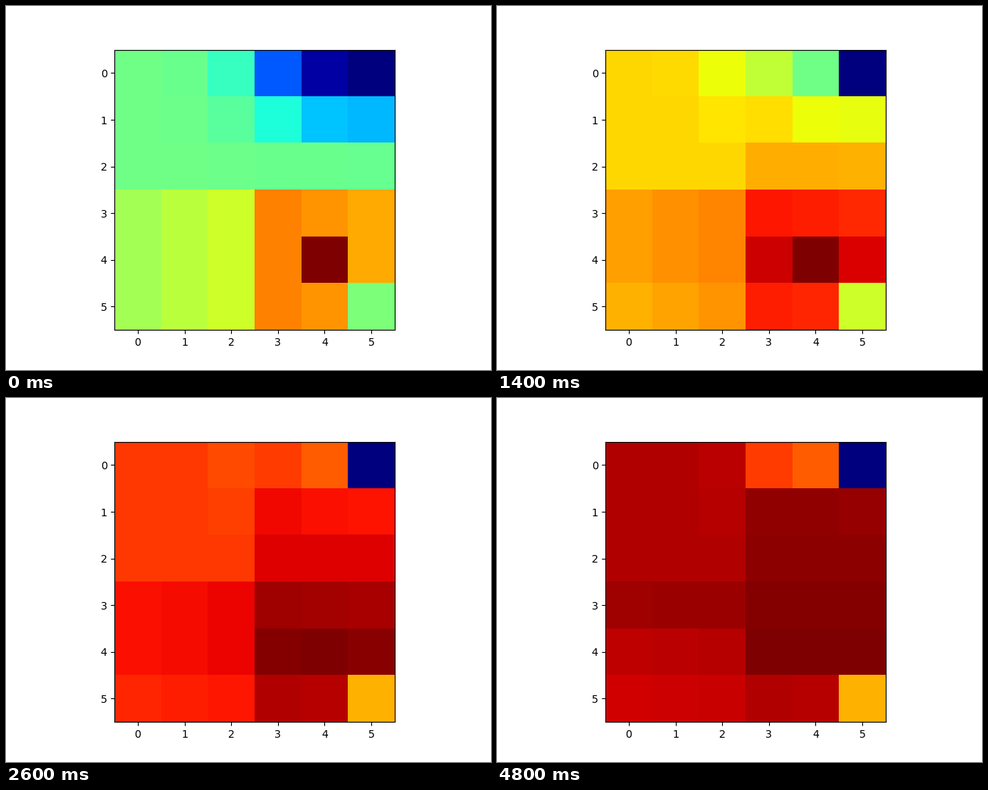
Animation, 640 px wide and 480 px high, one loop 5000 ms. Source, as a matplotlib script:

```python
import numpy as np
import matplotlib.pyplot as plt
from matplotlib.animation import FuncAnimation

FRAMES, INTERVAL = 25, 200
GOAL, TRAP, CORNER = (4, 4), (0, 5), (5, 5)

row, col = np.indices((6, 6))
right = col > 2
low = row >= 3

# Initial gap to the full value 1: widest around the trap, narrow near the goal.
trap_pull = np.exp(-((5 - col) / 2.4) ** 3 - row ** 2)
gap = np.where(low,
               np.interp(col, [0, 2, 3, 5], [0.45, 0.4, 0.23, 0.27]),
               0.515 + 0.485 * trap_pull)
gap[GOAL] = 0
gap[CORNER] = 0.5

# Decay rate of the gap: the right half and the rows by the goal learn faster.
beside_goal = (row == GOAL[0]) & (abs(col - GOAL[1]) == 1)
rate = (1.05 + 0.5 * right + 0.15 * ((row == 3) | (row == 4))
        + 1.3 * beside_goal)
rate[TRAP] = 0
rate[CORNER] = 0.55

# Seldom visited cells stop learning early.
limit = np.full(gap.shape, np.inf)
limit[4:, :3] = 1.75
limit[[0, 5], 3:] = 1.05


def progress(t):
    """Amount learned after t seconds; the right half starts more slowly."""
    times = [0, 0.8, 1.8, 3.4, 4.8]
    slow, fast = (np.interp(t, times, [0, first, 0.63, 1.73, 2.3])
                  for first in (0.08, 0.2))
    return np.minimum(np.where(right, slow, fast), limit)


def values(t):
    return 1 - gap * np.exp(-rate * progress(t))


fig, ax = plt.subplots(figsize=(6.4, 4.8), dpi=100)
heat = ax.imshow(values(0), cmap="jet", vmin=0, vmax=1)


def update(i):
    heat.set_data(values(i * INTERVAL / 1000))
    return [heat]


anim = FuncAnimation(fig, update, frames=FRAMES, interval=INTERVAL,
                     repeat=True, repeat_delay=0)
plt.show()
```
